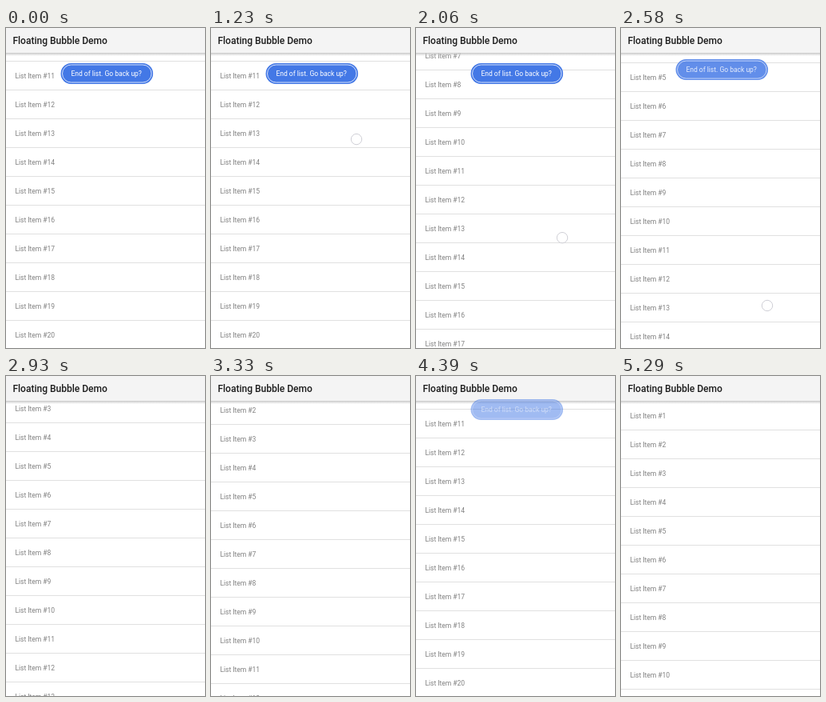
Write an HTML page with a canvas that moves like this. It is 249 px wide and 400 px high and loops after 5.49 s.

```html
<!DOCTYPE html>
<html lang="en">
<head>
<meta charset="utf-8">
<title>Floating Bubble Demo</title>
<style>
  html, body { margin: 0; width: 100%; height: 100%; overflow: hidden; background: #fff; }
  canvas { display: block; }
</style>
</head>
<body>
<canvas id="stage" width="249" height="400"></canvas>
<script>
const ctx = document.getElementById('stage').getContext('2d');
const LOOP = 5490, JUMP_TO_TOP = 5290;
const ROWS = 20, ROW_HEIGHT = 36;
const FONT = 'Roboto, sans-serif';

// Points are [time, value]; the curve between them is smooth and never overshoots.
const scrollPath = [[1230, 350], [1400, 338], [2060, 231], [2580, 132],
                    [3330, 43], [3420, 41], [3870, 192], [4130, 350]];
const touches = [
  { from: 1230, to: 2620, x: [[1230, 182], [2060, 183]],
    y: [[1230, 139], [1400, 148], [2060, 262], [2500, 347]] },
  { from: 3420, to: 4000, x: [[3420, 206], [4000, 206]],
    y: [[3420, 345], [3870, 194], [4000, 115]] },
  { from: 5150, to: JUMP_TO_TOP, x: [[5150, 126], [5290, 126]],
    y: [[5150, 58], [5290, 58]] }
];

function slope(points, i) {
  const [a, b] = [points[i], points[i + 1]];
  return (b[1] - a[1]) / (b[0] - a[0]);
}

function tangent(points, i) {
  if (i === 0) return slope(points, 0);
  if (i === points.length - 1) return slope(points, i - 1);
  const before = slope(points, i - 1), after = slope(points, i);
  return before * after <= 0 ? 0 : 2 * before * after / (before + after);
}

function follow(points, t) {
  const last = points.length - 1;
  if (t <= points[0][0]) return points[0][1];
  if (t >= points[last][0]) return points[last][1];
  const i = points.findIndex(p => p[0] > t) - 1;
  const [t0, v0] = points[i], [t1, v1] = points[i + 1];
  const span = t1 - t0, u = (t - t0) / span;
  return v0 + (v1 - v0) * u * u * (3 - 2 * u)
    + span * u * (1 - u) * ((1 - u) * tangent(points, i) - u * tangent(points, i + 1));
}

function ease(t, start, duration) {
  const u = Math.min(1, Math.max(0, (t - start) / duration));
  return (1 - Math.cos(Math.PI * u)) / 2;
}

function label(text, x, y, size, color, weight = 400) {
  ctx.font = `${weight} ${size}px ${FONT}`;
  ctx.fillStyle = color;
  ctx.fillText(text, x, y);
}

function pill(x, y, w, h) {
  ctx.beginPath();
  ctx.roundRect(x, y, w, h, h / 2);
}

function drawList(scroll) {
  for (let row = 0; row < ROWS; row++) {
    const y = row * ROW_HEIGHT - scroll;
    label(`List Item #${row + 1}`, 11.4, y + 53, 8.48, '#808080');
    ctx.fillStyle = '#e0e0e0';
    ctx.fillRect(0, y + 67, 249, 1);
  }
}

function drawHeader() {
  ctx.fillStyle = '#f4f4f4';
  ctx.fillRect(0, 0, 249, 31);
  const shadow = ctx.createLinearGradient(0, 31, 0, 35);
  shadow.addColorStop(0, '#c8c8c8');
  shadow.addColorStop(1, '#c8c8c800');
  ctx.fillStyle = shadow;
  ctx.fillRect(0, 31, 249, 4);
  label('Floating Bubble Demo', 8.4, 20, 12, '#1c1c1c', 500);
}

function drawBubble(shown) {
  if (shown <= 0) return;
  ctx.save();
  ctx.globalAlpha = shown;
  ctx.translate(0, -30 * (1 - shown));
  ctx.fillStyle = '#4378e6';
  pill(68.5, 44, 115.5, 26);
  ctx.fill();
  ctx.strokeStyle = '#d3e0fb';
  ctx.lineWidth = 1;
  pill(70.5, 46, 111.5, 22);
  ctx.stroke();
  label('End of list. Go back up?', 81.4, 60, 8.5, '#fff');
  ctx.restore();
}

function drawTouch(touch, t) {
  if (t < touch.from || t >= touch.to) return;
  ctx.beginPath();
  ctx.arc(follow(touch.x, t), follow(touch.y, t), 6.7, 0, 2 * Math.PI);
  ctx.fillStyle = 'rgba(255,255,255,.5)';
  ctx.fill();
  ctx.strokeStyle = '#cfcfd6';
  ctx.lineWidth = 1;
  ctx.stroke();
}

function draw() {
  const t = performance.now() % LOOP;
  const atTop = t >= JUMP_TO_TOP;
  ctx.fillStyle = '#fff';
  ctx.fillRect(0, 0, 249, 400);
  drawList(atTop ? 0 : Math.round(follow(scrollPath, t)));
  drawHeader();
  if (!atTop) drawBubble(t < 3500 ? 1 - ease(t, 2480, 380) : ease(t, 4140, 500));
  touches.forEach(touch => drawTouch(touch, t));
  requestAnimationFrame(draw);
}
draw();
</script>
</body>
</html>
```
